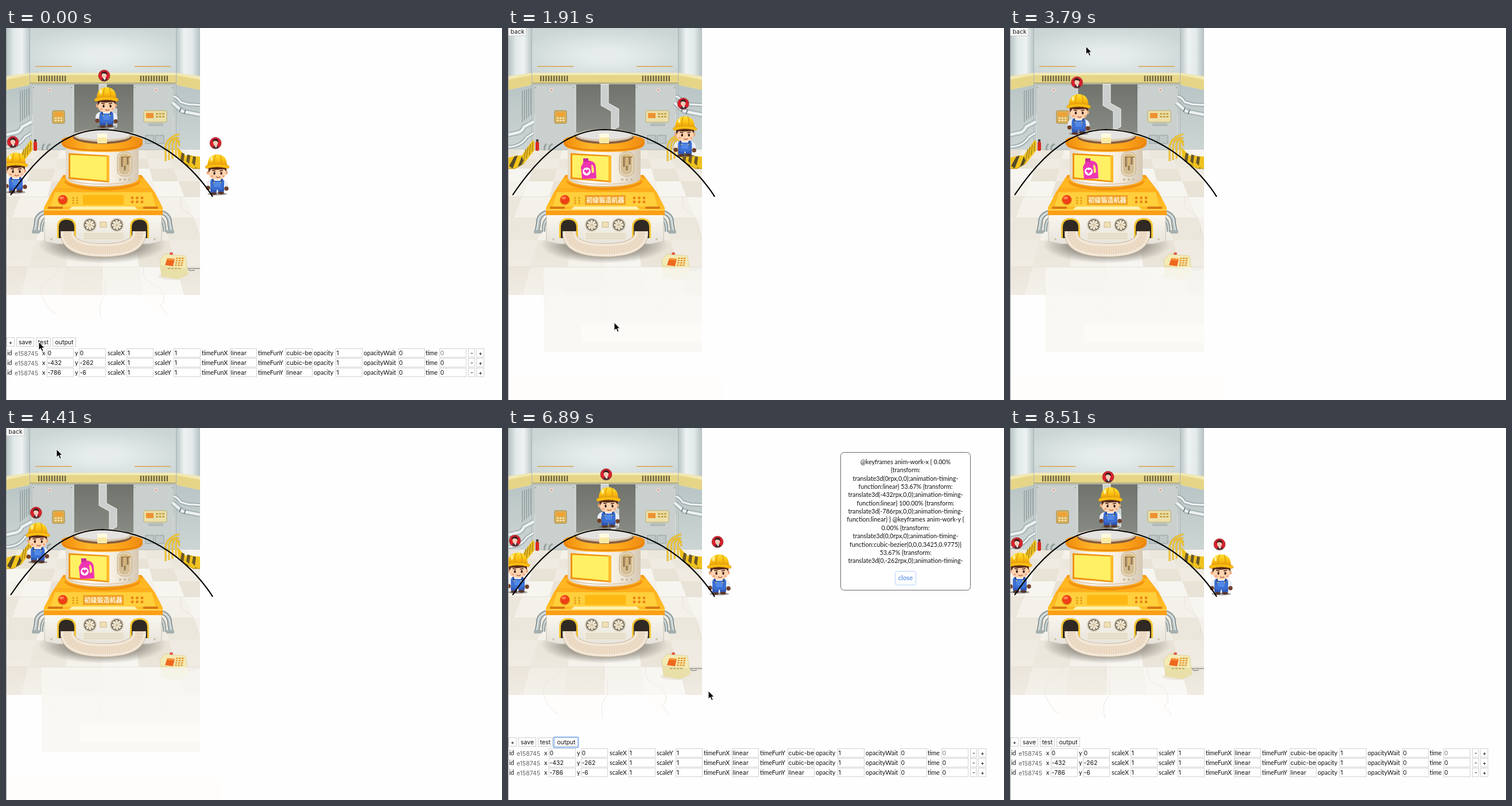
These frames come from a looping animation (864 px wide and 648 px high, 8.61 s). An HTML page:

```html
<!DOCTYPE html>
<html lang="en">
<head>
<meta charset="utf-8">
<title>Motion path editor</title>
<style>
html, body { margin: 0; width: 100%; height: 100%; overflow: hidden; background: #fefefe; }
svg { display: block; width: 864px; height: 648px; }
.ui { font: 10.5px Inter, "Liberation Sans", sans-serif; fill: #111; }
.label { font: 10.7px Lato, "Open Sans", sans-serif; fill: #111; }
.cn { font: bold 11px "Noto Sans CJK SC", "Noto Sans CJK", sans-serif; fill: #fffbe6; }
</style>
</head>
<body>
<svg id="stage" viewBox="0 0 864 648" xmlns="http://www.w3.org/2000/svg"></svg>
<script>
const LOOP = 8610;
const TEST_ON = 1310, TEST_OFF = 5280, POPUP_ON = 6180, POPUP_OFF = 7800;
const RUN_START = 1330, RUN_TIME = 3490, MID = 0.5367;

const rect = (x, y, w, h, fill, more = '') =>
  `<rect x="${x}" y="${y}" width="${w}" height="${h}" fill="${fill}" ${more}/>`;
const poly = (points, fill, more = '') => `<polygon points="${points}" fill="${fill}" ${more}/>`;
const oval = (x, y, rx, ry, fill, more = '') =>
  `<ellipse cx="${x}" cy="${y}" rx="${rx}" ry="${ry}" fill="${fill}" ${more}/>`;
const dot = (x, y, r, fill, more) => oval(x, y, r, r, fill, more);
const shape = (d, fill, more = '') => `<path d="${d}" fill="${fill}" ${more}/>`;
const line = (d, color, width = 1, more = '') =>
  `<path d="${d}" fill="none" stroke="${color}" stroke-width="${width}" ${more}/>`;
const text = (x, y, s, cls = 'ui', more = '') => `<text x="${x}" y="${y}" class="${cls}" ${more}>${s}</text>`;
const repeat = (n, fn) => Array.from({ length: n }, (_, i) => fn(i)).join('');
const mirror = s => s + `<g transform="matrix(-1 0 0 1 338 0)">${s}</g>`;
const gradient = (id, colors, down = true) =>
  `<linearGradient id="${id}" x2="${down ? 0 : 1}" y2="${down ? 1 : 0}">` +
  colors.map((c, i) => `<stop offset="${i / (colors.length - 1)}" stop-color="${c}"/>`).join('') +
  '</linearGradient>';

const defs = `<defs>
  ${gradient('pillar', ['#b4c1c2', '#e3eaea', '#edf1f1', '#b6c3c4'], false)}
  ${gradient('side', ['#b9c5c5', '#ccd5d3'])}
  ${gradient('lower', ['#c0c9c7', '#d2d7d4'])}
  ${gradient('door', ['#6f736c', '#878b84'])}
  ${gradient('drum', ['#e5d9c5', '#fffdf6', '#f5eee0', '#d5c8b4'], false)}
  ${gradient('cap', ['#f08c0c', '#ffb528', '#ffa81c', '#ee8a10'], false)}
  ${gradient('slab', ['#f89c14', '#ffb41e', '#ffc22c'])}
  ${gradient('base', ['#fbf8f0', '#e6e3dc'])}
  ${gradient('hat', ['#ffe03a', '#fcc414', '#e99a08'])}
  ${gradient('fade', ['#fff0', '#fff0', '#ffffff50'])}
  <radialGradient id="wall" cy=".6" r=".65"><stop offset=".2" stop-color="#e6ecec"/><stop offset="1" stop-color="#cad5d4"/></radialGradient>
  <radialGradient id="shade"><stop offset=".6" stop-color="#a39e94"/><stop offset="1" stop-color="#a39e94" stop-opacity="0"/></radialGradient>
  <clipPath id="room"><rect width="338" height="648"/></clipPath>
  <clipPath id="page"><rect width="864" height="648"/></clipPath>
</defs>`;

function floor() {
  const rows = [211, 228, 245, 267, 294, 330, 370, 416, 465];
  const tones = ['#e9e3d7', '#f4f1ea', '#efebe2', '#f7f5f0', '#ece7dc'];
  const at = (k, y) => Math.round(168 + k * (y + 60) * 0.135);
  let out = rect(0, 211, 338, 254, '#f1ede5');
  rows.slice(0, -1).forEach((y, i) => {
    const y2 = rows[i + 1];
    for (let k = -6; k < 6; k++) {
      const tone = tones[(k * 2 + i * 3 + 30) % 5];
      out += poly(`${at(k, y)},${y} ${at(k + 1, y)},${y} ${at(k + 1, y2)},${y2} ${at(k, y2)},${y2}`, tone);
    }
  });
  out += line('M0 416H338M0 294H80M258 294H338', '#ddd8ce', .7);
  out += shape('M62 465Q70 490 84 497L84 510L154 510Q160 490 168 465ZM240 465Q258 500 275 503L278 465Z', '#fefdfb');
  out += line('M92 416Q90 428 78 436Q58 445 62 465Q70 490 86 497M167 416V434L173 441V466Q158 482 166 507M240 416Q236 434 252 445Q278 452 275 477L268 484L282 500M20 320Q0 330 8 350M305 294Q300 316 318 322Q338 340 330 362', '#ddd6cb', .7, 'stroke-dasharray="5 1"');
  return out + rect(0, 330, 338, 136, 'url(#fade)');
}

function wall() {
  const sides = mirror(
    shape('M0 0H42V212H0Z', 'url(#pillar)') +
    poly('0,108 42,99 42,212 0,212', 'url(#side)') +
    poly('0,84 42,78 42,99 0,108', '#e6d587') + poly('0,84 42,78 42,82 0,90', '#f1e8b5') +
    line('M41.5 0V212', '#a8b5b8') + line('M51 67H114', '#d9a24e', 1.6) +
    rect(45, 99, 73, 113, '#c9d0ce', 'stroke="#aeb6b4"') +
    line('M46 150V210M117 100V180', '#e1e6e5') +
    repeat(11, i => rect(56 + i * 4.6, 83, 2.3, 10, '#6c6340')) +
    dot(76, 108, 3, '#f3e5df') + dot(76, 108, 1.6, '#cd8a72') +
    dot(48, 104, 1, '#858d8d') + dot(114, 104, 1, '#858d8d') +
    poly('0,226 16,222 28,222 28,236 12,245 0,245', '#f3c51b') +
    poly('2,240 11,224 17,222 8,245', '#54492b') + poly('17,242 24,224 28,223 28,230 23,239', '#54492b') +
    line('M0 245L12 245L28 236', '#b58b18'));
  const pipes = (d, w) => line(d, '#8b999d', w + 2) + line(d, '#d9e0e1', w) + line(d, '#f6f8f8', w / 3);
  return rect(0, 0, 338, 212, '#d3dadb') + rect(42, 0, 254, 80, 'url(#wall)') +
    rect(42, 95, 254, 117, 'url(#lower)') +
    rect(42, 78, 254, 18, '#e6d587') + rect(42, 78, 254, 4, '#f3eab9') + rect(42, 95, 254, 2, '#b4aa79') +
    sides + rect(119, 98, 103, 84, 'url(#door)') +
    poly('162,98 175,98 175,131 193,141 193,172 180,179 180,145 162,135', '#cbd0ce', 'stroke="#eff2f0"') +
    repeat(5, i => line(`M${25 + i * 3.7} ${109 - i}V${164 - i * 3}`, '#8d9a9b', 1.4)) +
    pipes('M0 186L18 182Q25 180 28 172L45 163', 6) + pipes('M0 207Q22 207 33 190L44 183', 4) +
    pipes('M292 119Q300 121 304 129L318 133L338 134', 4) + pipes('M290 130L307 145L338 151', 6) +
    line('M305 139L302 146M313 142L310 150', '#76858a', 2) +
    rect(81, 144, 21, 22, '#d8b25d', 'rx="2" stroke="#a9853b"') + rect(84, 147, 15, 7, '#f0a234') +
    repeat(6, i => rect(85 + i % 3 * 5, 156 + (i / 3 | 0) * 4, 3, 2, '#fff0bd')) +
    rect(240, 144, 40, 20, '#ebe0a9', 'rx="2" stroke="#b9aa6c"') + rect(244, 148, 13, 9, '#ee9231') +
    repeat(6, i => rect(261 + i % 3 * 5.5, 148 + (i / 3 | 0) * 5, 4, 3, '#c7a64c')) +
    rect(248, 166, 26, 5, '#b4bbb8') +
    rect(243, 187, 14, 14, '#bfc7c7', 'stroke="#939e9e"') + rect(260, 187, 15, 14, '#bfc7c7', 'stroke="#939e9e"') +
    rect(48, 198, 6, 16, '#d92b20', 'rx="2"') + rect(49, 194, 4, 4, '#443c39') +
    line('M64 213Q62 206 67 202M72 213Q70 205 78 202', '#98a2a1', 3);
}

function rails() {
  const rail = i => `M${278 + i * 6} ${232 - i * 2}V${206 - i}Q${281 + i * 6} ${190 - i} 302 ${185 + i * 7}`;
  return poly('24,222 43,195 46,198 46,213 28,236', '#f1c324') +
    repeat(4, i => line(`M${27 + i * 5} ${233 - i * 6}L${31 + i * 4} ${211 - i * 4}`, '#a2801d', 1.5)) +
    repeat(4, i => line(rail(i), '#c9981c', 3) + line(rail(i), '#f8d13c', 1.8)) +
    poly('298,207 312,222 338,224 338,243 322,243 300,225', '#efc21e') +
    repeat(3, i => poly(`${306 + i * 10},${217 + i * 3} ${311 + i * 10},${219 + i * 3} ${309 + i * 10},${234 + i * 3} ${304 + i * 10},${229 + i * 3}`, '#6c5827'));
}

function fan(x) {
  return dot(x, 343, 12, '#d8cdb7') + dot(x, 343, 10, '#5c5349') +
    repeat(8, i => `<g transform="rotate(${i * 45} ${x} 343)">${poly(`${x - 1},342 ${x - 3},334.5 ${x + 2},334.5 ${x + 1},342`, '#f1e7d1')}</g>`) +
    dot(x, 343, 2.6, '#d6c4a1');
}

function machine() {
  const legs = mirror(
    line('M70 320Q52 325 53 340L50 357', '#7d898b', 8) + line('M70 320Q52 325 53 340L50 357', '#bcc6c6', 5) +
    line('M69 321Q52 326 52 340L49 356', '#e6eaea', 1.5) +
    line('M69 332Q61 338 62 355', '#838f90', 6) + line('M69 332Q61 338 62 355', '#ccd4d3', 3) +
    rect(45, 352, 14, 6, '#a4afb0', 'rx="2"'));
  const arches = mirror(
    shape('M89 366V347Q89 331 105 331Q122 331 122 347V366Z', '#f4c532') +
    shape('M92 366V348Q92 334 105 334Q119 334 119 348V366Z', '#302923') +
    rect(73, 311, 26, 4, '#d67b11', 'rx="1"') + dot(79, 368, 1.7, '#c9b99c'));
  const belt = 'M107 354V361Q112 387 169 387Q226 387 232 361V354';
  return oval(168, 378, 112, 32, 'url(#shade)') + legs +
    poly('67,322 271,322 271,372 250,376 88,376 67,372', 'url(#base)', 'stroke="#c8c1b4"') +
    poly('100,256 236,256 259,286 273,313 273,326 66,326 66,313 80,286', 'url(#slab)') +
    poly('96,262 240,262 252,279 86,279', '#ffb722') + poly('85,286 254,286 260,311 78,311', '#ffcf3c') +
    poly('66,316 273,316 273,326 66,326', '#fb9f16') + rect(66, 316, 207, 2, '#ffd157') +
    poly('115,311 224,311 229,316 110,316', '#fff0b1') + arches +
    dot(99, 300, 9, '#e0a31b') + dot(99, 299, 8, '#ee3f18') + oval(97, 296, 4, 2.5, '#ff8050') +
    repeat(6, i => dot(117 + i % 2 * 7, 296 + (i / 2 | 0) * 4.5, 1.7, '#e79b15')) +
    repeat(6, i => dot(220 + i % 3 * 8.5, 296 + (i / 3 | 0) * 7, 2.4, '#ec8118')) +
    rect(134, 291, 71, 17, '#fdb814') +
    oval(168, 267, 66, 16, '#f2920f') + oval(168, 263, 66, 15, '#ffae20') + oval(168, 262, 62, 15, '#d9bfa0') +
    shape('M104 205V261Q108 275 168 275Q228 275 231 261V205Z', 'url(#drum)') +
    line('M105 259Q110 272 168 272Q226 272 230 259', '#e0cbb0', 2) +
    shape('M97 195Q100 186 168 186Q235 186 238 195V202Q235 216 168 216Q101 216 97 202Z', 'url(#cap)') +
    line('M98 200Q105 213 168 213Q231 213 237 200', '#e67f0c', 2) +
    oval(168, 190, 51, 12, '#885f40') + oval(168, 187, 50, 11, '#d8c7ae') + oval(168, 186, 47, 8, '#e4e3e1') +
    rect(159, 184, 17, 17, '#fae9a5') + rect(159, 184, 17, 7, '#fffae0') +
    poly('109,218 180,222 180,269 109,263', '#ef930f') + poly('112,221 175,224 175,266 112,260', '#fff064') +
    poly('175,222 180,222 180,269 175,266', '#ffba2b') +
    rect(194, 216, 25, 42, '#e7d7b9', 'rx="10" stroke="#bfa981"') + rect(197, 219, 19, 36, '#d4bd94', 'rx="8"') +
    line('M202 224H217M202 224V242M207 225V248M212 225V238', '#98764a', 3) + line('M202 223H220M207 225V240', '#f6d583', 1.7) +
    repeat(3, i => dot(199 + i * 8, 264, 2.2, '#cdbd9e')) +
    fan(146) + fan(193) + rect(164, 338, 11, 9, '#efe0b5', 'stroke="#cbb88a"') +
    rect(133, 355, 73, 14, '#f2ecdd') + repeat(4, i => line(`M135 ${358 + i * 3}H205`, '#d2c5a9')) +
    line(belt, '#cbb79d', 24) + line(belt, '#f3e8d8', 22) + line(belt, '#e7d3bb', 14) +
    line(belt, '#efe0cc', 14, 'stroke-dasharray="2 2"');
}

function device() {
  return oval(294, 433, 29, 6, '#ece7dc') + line('M315 419H338M319 420Q317 424 327 422H329', '#666', 1) +
    poly('268,404 277,394 313,397 317,429 300,437 271,432', '#f3eab5', 'stroke="#d8ca92" stroke-width=".7"') +
    poly('268,413 317,419 317,429 300,437 271,432', '#e9dfa8') +
    poly('281,401 294,402 291,415 277,413', '#ee671d') + poly('281,401 294,402 293,405 280,404', '#f99338') +
    repeat(12, i => rect(296 + i % 3 * 5 - (i / 3 | 0) * .6, 400 + (i / 3 | 0) * 4, 3.6, 2.4, '#e49a34')) +
    rect(285, 391, 6, 4, '#d2bd80') + oval(288, 393, 2.8, 2.2, '#e25b4c') +
    repeat(4, i => rect(282 + i * 6, 418, 4, 2, '#bda861'));
}

function worker(id) {
  const leg = (side, x) => `<g class="${side}">${rect(x, 55, 11, 12, '#3159b6', 'rx="3"')}${oval(x + 5.5, 68, 5.5, 2.3, '#5a3528')}</g>`;
  const arm = (side, s) => `<g class="${side}">${line(`M${s * 9} 46Q${s * 17} 48 ${s * 16} 55`, '#e9edf5', 6, 'stroke-linecap="round"')}${dot(s * 16, 59, 3.7, '#70402b')}</g>`;
  return `<g id="${id}">` + oval(0, 69, 17, 2.5, '#6669') + leg('up', -12) + leg('down', 1) + arm('down', -1) + arm('up', 1) +
    rect(-12, 42, 24, 20, '#3c6fd2', 'rx="6"') + rect(-7, 40, 14, 6, '#f4f6fa') +
    line('M-8 42L-6 50M8 42L6 50', '#244794', 2.5) + rect(-6, 48, 12, 9, '#5288e6', 'rx="2"') +
    dot(-6, 49, 1.1, '#ffd23c') + dot(6, 49, 1.1, '#ffd23c') +
    dot(-15, 32, 3.5, '#eda77b') + dot(15, 32, 3.2, '#eda77b') +
    shape('M-15 22H15V33Q14 44 0 44Q-14 44 -15 33Z', '#fdd3ae') +
    shape('M-16 20H16V30L12 26L-3 27L-11 26L-15 32Z', '#53291b') +
    line('M-9 28L-3 29M4 29L10 28', '#4b2118', 1.7) +
    oval(-5, 33, 1.7, 2.6, '#33170f') + oval(7, 33, 1.7, 2.6, '#33170f') +
    oval(-9, 38, 2.5, 1.5, '#f3a083') + oval(11, 38, 2, 1.5, '#f3a083') + line('M-2 39Q2 42 5 39', '#a04a35', 1.2) +
    shape('M-17 20Q-17 1 0 0Q17 1 17 20Z', 'url(#hat)') +
    shape('M-21 22Q-20 17 0 17Q20 17 21 22Q20 26 15 24Q0 20 -15 24Q-20 26 -21 22Z', '#f8bd13', 'stroke="#d68d0a" stroke-width=".7"') +
    line('M-3 1Q-6 8 -5 16M5 1Q8 8 7 16', '#dc9a0b', 1.4) + oval(-10, 8, 2, 4, '#fff09b') +
    `<g class="badge">${dot(0, 0, 10, '#d9202c', 'stroke="#94433f" stroke-width=".8"')}` +
    shape('M-5 8.5Q-4 4 0 4Q5 4 6 8Q0 11 -5 8.5Z', '#4a3136') + poly('-2,4 3,4 1,8', '#f4eae6') +
    oval(0, -.5, 4.2, 5, '#f0cdb8') + shape('M-5 -1Q-6 -7 0 -7.5Q6 -7 5 -1Q3 -4 -1 -4Q-4 -4 -5 -1Z', '#3a2020') + '</g></g>';
}

function editor() {
  const box = (x, y, w, s, color = '#111') =>
    rect(x + .5, y + .5, w, 15, '#fff', 'stroke="#d2d2d2"') + text(x + (w < 20 ? 4 : 1.5), y + 12, s, 'ui', `style="fill:${color}"`);
  const names = ['id', 'x', 'y', 'scaleX', 'scaleY', 'timeFunX', 'timeFunY', 'opacity', 'opacityWait', 'time'];
  const labelX = [2, 63, 120, 177, 259, 341, 439, 536, 623, 731];
  const fieldX = [14, 71, 127, 210, 292, 390, 487, 574, 683, 755];
  const rows = [['0', '0', 'cubic-be'], ['-432', '-262', 'cubic-be'], ['-786', '-6', 'linear']];
  const table = rows.map(([x, y, ease], r) => {
    const top = 558 + r * 17;
    const values = ['e158745', x, y, 1, 1, 'linear', ease, 1, 0, 0];
    return names.map((n, i) => {
      const grey = i === 9 && r === 0;
      return (i ? box(fieldX[i], top, 46, values[i], grey ? '#777' : '#111') : text(15, top + 12.5, values[0], 'ui', 'style="fill:#666"')) +
        text(labelX[i], top + 12, n, 'label');
    }).join('') + box(805, top, 11, '-') + box(819, top, 13, '+');
  }).join('');
  const button = (x, w, s) => rect(x + .5, 539.5, w, 15, '#fff', 'stroke="#d0d0d0"') +
    text(x + w / 2 + .5, 551, s, 'ui', 'text-anchor="middle"');
  return `<g id="editor">${worker('w0')}${worker('w1')}${worker('w2')}` +
    button(1, 13, '+') + button(18, 30, 'save') + button(52, 25, 'test') + button(81, 40, 'output') + table + '</g>';
}

function popup() {
  const lines = ['@keyframes anim-work-x { 0.00%', '{transform:', 'translate3d(0rpx,0,0);animation-timing-',
    'function:linear} 53.67% {transform:', 'translate3d(-432rpx,0,0);animation-timing-',
    'function:linear} 100.00% {transform:', 'translate3d(-786rpx,0,0);animation-timing-',
    'function:linear} } @keyframes anim-work-y {', '0.00% {transform:',
    'translate3d(0,0rpx,0);animation-timing-', 'function:cubic-bezier(0,0,0.3425,0.9775)}',
    '53.67% {transform:', 'translate3d(0,-262rpx,0);animation-timing-'];
  return '<g id="popup">' + rect(79.5, 538.5, 43, 18, 'none', 'rx="2" stroke="#8bb9f3" stroke-width="2"') +
    rect(579.5, 42.5, 226, 240, '#fff', 'rx="6" stroke="#666"') +
    lines.map((s, i) => text(692.5, 63 + i * 14.35, s, 'label', 'text-anchor="middle"')).join('') +
    rect(674.5, 249.5, 36, 24, '#fff', 'rx="3" stroke="#b5cffb"') +
    text(692.5, 265, 'close', 'label', 'text-anchor="middle" style="fill:#3778e8;font-size:11.3px"') + '</g>';
}

function tester() {
  return '<g id="tester">' + rect(62, 417, 276, 148, '#f8f7f2', 'opacity=".85"') +
    rect(128, 517, 210, 31, '#fcfbf8') + rect(0, 608, 375, 40, '#fefdfb') +
    rect(134, 291, 71, 17, '#efa126') + text(169.5, 304, '初级锻造机器', 'cn', 'text-anchor="middle"') +
    shape('M131 235Q130 231 135 231H141Q153 232 153 244L154 262L129 263L127 242Z', '#ee35b2') +
    shape('M145 238Q150 238 150 251L146 253Z', '#fff064') +
    rect(131, 227, 9, 6, '#c62c9d', 'rx="1"') + dot(137, 250, 7, '#fff') +
    shape('M137 254L132 249L135 246L137 248L140 246L142 249Z', '#ee35b2') +
    `<g clip-path="url(#room)">${worker('runner')}</g>` +
    rect(.5, -2.5, 31, 16, '#fff', 'stroke="#ccc"') + text(4.5, 10, 'back') + '</g>';
}

const stage = document.getElementById('stage');
stage.innerHTML = defs + rect(0, 0, 864, 648, '#fefefe') +
  `<g clip-path="url(#room)">${floor()}${wall()}${rails()}${machine()}${device()}</g>` +
  `<g clip-path="url(#page)">${editor()}${tester()}</g>` +
  line('M360 294C360 294 294 180 168 177C110 177 60 214 8 291', '#000', 2.2) +
  line('M.5 0V648', '#999') + popup() +
  '<path id="cursor" d="M0 0V14L3.3 11L5.8 16.5L8.2 15.4L5.8 10.2H10Z" fill="#000" stroke="#fff" stroke-width="1"/>';

const el = id => document.getElementById(id);
const place = (node, x, y) => node.setAttribute('transform', `translate(${x.toFixed(2)} ${y.toFixed(2)})`);
const show = (node, on) => node.setAttribute('visibility', on ? 'visible' : 'hidden');

function bezier(x1, y1, x2, y2) {
  const at = (a, b, u) => 3 * a * u * (1 - u) ** 2 + 3 * b * u * u * (1 - u) + u ** 3;
  return x => {
    let lo = 0, hi = 1;
    for (let i = 0; i < 24; i++) {
      const m = (lo + hi) / 2;
      if (at(x1, x2, m) < x) lo = m; else hi = m;
    }
    return at(y1, y2, lo);
  };
}
const rise = bezier(0, 0, 0.3425, 0.9775), fall = bezier(0.3625, 0, 0.675, 0.325);

// Position along the path, in page pixels.
function runnerAt(p) {
  if (p < MID) return [368 - 194 * p / MID, 220 - 117 * rise(p / MID)];
  const q = (p - MID) / (1 - MID);
  return [174 - 159 * q, 103 + 114 * fall(q)];
}

const cursorPath = [
  [0, 57, 547], [1310, 57, 547], [1910, 185, 513], [2530, 213, 90], [3070, 215, 28],
  [3400, 150, 30], [4410, 88, 37], [5000, 14, 5], [5220, 14, 5], [5460, 143, 156],
  [6000, 100, 546], [6250, 100, 546], [6890, 349, 458], [7500, 690, 260], [7800, 690, 262], [8430, 500, 660]
];
function cursorAt(t) {
  const i = cursorPath.findIndex(k => k[0] > t);
  if (i < 0) return cursorPath.at(-1).slice(1);
  const [t0, x0, y0] = cursorPath[i - 1], [t1, x1, y1] = cursorPath[i];
  const p = (t - t0) / (t1 - t0), e = p * p * (3 - 2 * p);
  return [x0 + (x1 - x0) * e, y0 + (y1 - y0) * e];
}

// Time advances in short holds, restarted at these moments.
const beats = [0, 860, 1730, 2620, 3490, 4410, 5280, 6180, 7070, 7970];
function hold(t) {
  const from = beats.findLast(b => b <= t);
  return from + Math.floor((t - from) / 88.7 + 1e-6) * 88.7;
}

const people = [['w0', 17, 217, -5, -18.5], ['w1', 175, 103, -4, -20], ['w2', 368, 220, -3, -19.5], ['runner', 0, 0, -3, -19.5]]
  .map(([id, x, y, bx, by]) => ({ node: el(id), badge: el(id).querySelector('.badge'), x, y, bx, by }));
const ups = stage.querySelectorAll('.up'), downs = stage.querySelectorAll('.down');
const runner = people[3];

function draw(time) {
  const t = hold(time);
  const testing = t >= TEST_ON - 10 && t < TEST_OFF;
  show(el('editor'), !testing);
  show(el('tester'), testing);
  show(el('popup'), t >= POPUP_ON && t < POPUP_OFF);
  if (testing) {
    const p = Math.max(0, t - RUN_START) / RUN_TIME % 1;
    [runner.x, runner.y] = runnerAt(p);
  }
  const clock = t < 860 ? Math.min(t, 320) + 700 : t;
  const bob = -2.3 * Math.cos(2 * Math.PI * (clock / 1000 - 0.95));
  for (const w of people) {
    place(w.node, w.x, w.y);
    place(w.badge, w.bx, w.by + bob);
  }
  const sway = 0.7 * Math.sin(2 * Math.PI * clock / 1000);
  ups.forEach(n => place(n, 0, -sway));
  downs.forEach(n => place(n, 0, sway));
  place(el('cursor'), ...cursorAt(t));
}

const start = performance.now();
function tick() {
  draw((performance.now() - start) % LOOP);
  requestAnimationFrame(tick);
}
draw(0);
requestAnimationFrame(tick);
</script>
</body>
</html>
```
